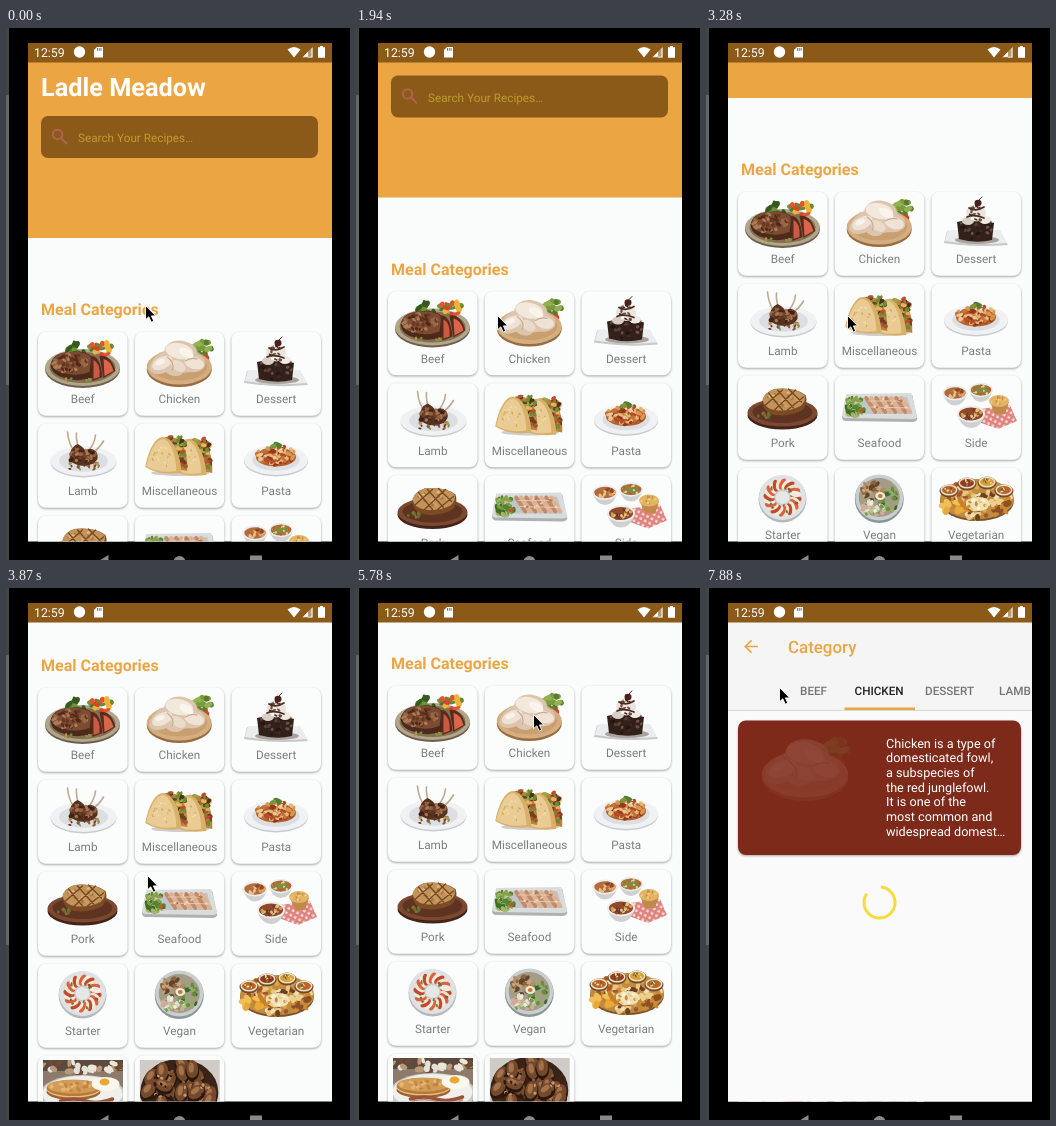
Write an HTML page that moves like this. It is 344 by 532 pixels and loops after 8000 ms.

```html
<!DOCTYPE html>
<html lang="en">
<head>
<meta charset="utf-8">
<title>Recipe app</title>
<style>
  html, body { margin: 0; width: 100%; height: 100%; overflow: hidden; background: #000; }
  svg { display: block; }
  text { font-family: Roboto, sans-serif; text-rendering: geometricPrecision; white-space: pre; }
  .label { font-size: 11.75px; fill: #7c7e7d; text-anchor: middle; }
  .card { fill: #fbfdfc; filter: drop-shadow(0 1px 1.1px rgba(0, 0, 0, .36)); }
  .food { filter: blur(.35px); }
  .tab { font-size: 11.7px; font-weight: 500; fill: #757575; }
  .tab.on { fill: #222; }
  .info { font-size: 12.65px; fill: #fff; }
</style>
</head>
<body>
<svg id="stage" width="344" height="532" viewBox="0 0 344 532">
  <defs>
    <clipPath id="view"><rect x="22" y="34" width="304" height="479.5"/></clipPath>
    <clipPath id="cardClip"><rect width="89.5" height="84" rx="8"/></clipPath>
    <pattern id="check" width="5" height="5" patternUnits="userSpaceOnUse" patternTransform="rotate(28)">
      <rect width="5" height="5" fill="#f3dfda"/><path d="M0 0H2.5V5H0ZM0 0H5V2.5H0Z" fill="#d2443f" fill-opacity=".6"/>
    </pattern>
  </defs>
  <rect width="344" height="532"/>
  <rect width="3" height="532" fill="#444"/>
  <rect y="67" width="3" height="290" fill="#666"/>

  <g clip-path="url(#view)">
    <rect x="22" y="34" width="304" height="480" fill="#f9fcfb"/>
    <g id="home">
      <rect x="22" y="0" width="304" height="210" fill="#eba643"/>
      <text x="35" y="68" font-size="25.3" font-weight="700" fill="#fff">Ladle Meadow</text>
      <rect x="35" y="88" width="277" height="42" rx="7" fill="#8b5a19"/>
      <g fill="none" stroke="#b0624e" stroke-width="2">
        <circle cx="51.5" cy="106.5" r="4.7"/><path d="M55 110L61 116"/>
      </g>
      <text x="72" y="114" font-size="11.75" fill="#bd9d2b">Search Your Recipes…</text>
      <text x="35" y="287" font-size="16" font-weight="700" fill="#eba643">Meal Categories</text>
      <g id="grid"></g>
    </g>

    <g id="page">
      <rect x="22" y="34" width="304" height="480" fill="#fafafa"/>
      <rect x="22" y="34" width="304" height="88.5" fill="#f5f5f5"/>
      <path d="M22 122.5H326" stroke="#d8d8d8"/>
      <path d="M52 58.5H39.5M45.5 52.3L39.3 58.5L45.5 64.7" fill="none" stroke="#eba643" stroke-width="1.7"/>
      <text x="82" y="65" font-size="16.9" font-weight="500" fill="#eba643">Category</text>
      <text class="tab" x="94" y="106.5">BEEF</text>
      <text class="tab on" x="148.5" y="106.5">CHICKEN</text>
      <text class="tab" x="219" y="106.5">DESSERT</text>
      <text class="tab" x="293" y="106.5">LAMB</text>
      <rect x="138.5" y="119.5" width="70.5" height="2.5" fill="#eba643"/>
      <rect x="32" y="132.5" width="283" height="134.5" rx="8" fill="#7d2a1b" style="filter:drop-shadow(0 1px 1px #0005)"/>
      <g id="photo" transform="translate(99 181) scale(1.33)"></g>
      <g id="info"></g>
      <circle id="spinner" cx="173.5" cy="314.5" r="15.5" fill="none" stroke="#f6dc40" stroke-width="3"/>
    </g>
  </g>

  <rect x="22" y="15" width="304" height="19.5" fill="#8b5a19"/>
  <text x="28" y="29" font-size="12.3" fill="#fff">12:59</text>
  <g fill="#fff">
    <circle cx="73.5" cy="24" r="5.7"/>
    <path d="M91 19H97V29.5H88V22Z"/>
    <path d="M281.5 21.5Q288 16.5 294.5 21.5L288 29.5Z"/>
    <path d="M306.5 19V29.5H296.5Z" fill-opacity=".4"/>
    <path d="M302 23.8V29.5H296.5ZM305.5 21V28.8H298.5L296.5 29.5H306.5V19Z"/>
    <path d="M314 18H317V19.2H319V29.8H312V19.2H314Z"/>
  </g>
  <path d="M91.5 20V22.8M93.3 20V22.8M95.1 20V22.8" stroke="#8b5a19" stroke-width=".9"/>
  <g fill="#8a8a8a">
    <path d="M102.5 527V541L91 534Z"/><circle cx="173.5" cy="534" r="6"/><rect x="244" y="527.5" width="12" height="12"/>
  </g>
  <path id="cursor" d="M.5 .5V14.8L3.8 11.8L6.3 17.2L8.8 16.1L6.4 10.9H10.7Z" stroke="#fff" stroke-width=".9"/>
</svg>

<script>
const $ = id => document.getElementById(id);
let seed = 7;
const rnd = () => (seed = seed * 16807 % 2147483647) / 2147483647;

const oval = (x, y, rx, ry, fill, turn = 0) =>
  `<ellipse cx="${x}" cy="${y}" rx="${rx}" ry="${ry}" fill="${fill}" transform="rotate(${turn} ${x} ${y})"/>`;
const shape = (d, fill) => `<path d="${d}" fill="${fill}"/>`;
const line = (d, color, width) =>
  `<path d="${d}" fill="none" stroke="${color}" stroke-width="${width}" stroke-linecap="round"/>`;

// Scatters small crumbs over an elliptical area.
function bits(n, x, y, rx, ry, size, colors) {
  let out = '';
  for (let i = 0; i < n; i++) {
    const a = rnd() * 6.283, r = Math.sqrt(rnd());
    out += oval((x + rx * r * Math.cos(a)).toFixed(1), (y + ry * r * Math.sin(a)).toFixed(1),
      (size * (.6 + rnd() * .6)).toFixed(1), (size * (.4 + rnd() * .4)).toFixed(1),
      colors[i % colors.length], Math.round(rnd() * 180));
  }
  return out;
}

const plate = (x, y, rx, ry) =>
  oval(x, y + 1.5, rx, ry, '#c9cbcd') + oval(x, y, rx, ry, '#f0f1f3') + oval(x, y, rx * .74, ry * .72, '#dcdee1');
const bowl = (x, y, r, colors) =>
  shape(`M${x - r} ${y}Q${x - r * .7} ${y + r} ${x} ${y + r}Q${x + r * .7} ${y + r} ${x + r} ${y}Z`, '#cfd0d2') +
  oval(x, y, r, r * .6, '#eeedeb') + oval(x, y, r * .86, r * .46, colors[0]) +
  bits(24, x, y, r * .75, r * .38, 2, colors);
const photo = body => `<svg x="-39.5" y="-27" width="80" height="54" viewBox="-39.5 -27 80 54">${body}</svg>`;

function starter() {
  let out = oval(0, 0, 24, 23.5, '#b5b8ba') + oval(0, -1.5, 23.5, 22.5, '#dfe1e2') + oval(0, -1.5, 19, 18, '#c9cbc9');
  for (let i = 0; i < 24; i++) {
    const a = i * Math.PI / 12;
    out += oval(13.5 * Math.cos(a), 13.5 * Math.sin(a) - 1.5, 6, 3,
      ['#c14a2b', '#efe3d2', '#d9623f', '#f3ebdf'][i % 4], i * 15 + 25);
  }
  return out + bits(14, 0, -1.5, 16, 15, 1.8, ['#66803c', '#8a5a38']) + oval(0, -1.5, 7, 6.5, '#e6e8e8');
}

// A folded shell with its filling along the open top edge.
const taco = (x, y) => `<g transform="translate(${x} ${y})">` +
  shape('M-19 10C-13-10-5-20 5-17C17-14 21 2 20 17Z', '#b78442') +
  bits(44, 7, -8, 12, 10, 2.8, ['#6a8d34', '#c4482c', '#6e4024', '#e3b458', '#96ab48', '#4e3220']) +
  bits(12, 16, 6, 4, 9, 2.6, ['#6a8d34', '#c4482c', '#6e4024']) +
  shape('M-22 13C-19-4-12-17-4-17C7-16 14 4 14 19Q-8 22-22 13Z', '#d9b06a') +
  shape('M-21 12C-17-4-11-15-4-15C4-13 9 4 9 17Q-8 20-21 12Z', '#e9cc93') +
  bits(18, -6, 3, 9, 11, 1.3, ['#d3a760', '#f1dcae']) + '</g>';

const foods = {
  Beef: oval(0, 6.5, 37.5, 18.5, '#6d5f4c') + oval(0, 4.5, 37.5, 18.5, '#b1a58c') + oval(0, 4.5, 33, 15.5, '#84704f') +
    bits(16, -3, -14, 13, 6, 4, ['#4f752c', '#6e9638', '#35591f']) +
    bits(14, 17, -13, 12, 7, 4, ['#e0552b', '#efb338', '#d8432c', '#648a35']) +
    shape('M-32 2Q-30-10-14-11Q2-13 10-6L12 14Q-4 20-18 15Q-31 12-32 2Z', '#4b2a1b') +
    shape('M-31 0Q-28-10-14-11Q2-12 9-6L7 9Q-6 14-18 10Q-30 8-31 0Z', '#7d4b31') +
    bits(46, -12, 0, 18, 9, 2.4, ['#50291a', '#99684a', '#693720', '#ad7d58']) +
    shape('M8-7Q18-8 20 14L10 18Z', '#5a2b1c') + shape('M11-3Q18 0 17 14L11 16Z', '#cb5a44') +
    shape('M17-7Q28-9 33 8L21 15Z', '#5a2b1c') + shape('M21-4Q28-3 31 8L22 13Z', '#d9654c') +
    bits(9, -8, 17, 18, 2, 1.8, ['#6d8e3a', '#b98b4d']),
  Chicken: bits(16, 20, -15, 12, 8, 4, ['#7a9b3d', '#92b152', '#587c2c']) + oval(26, -5, 4, 3.5, '#cf442c') +
    oval(0, 6.5, 32.5, 17.5, '#9a6c42') + oval(0, 4, 32.5, 17.5, '#d4ae80') + oval(0, 3.5, 28, 14, '#c99f70') +
    shape('M-30 6C-29-3-22-8-15-12C-14-19-6-24 4-22C15-20 18-14 18-9C27-6 29 4 22 7C15 11 9 8 4 10C-3 16-10 12-13 9C-21 13-28 11-30 6Z', '#dcc5ae') +
    oval(0, -12, 14, 8, '#f3e8dc', 12) + oval(-17, 0, 11, 6, '#efe2d5', -25) + oval(15, 0, 10, 6, '#f0e2d4', 15) +
    oval(-1, 3, 8, 5, '#eadaca', 30) + oval(7, -10, 8, 4, '#faf4ec', 30) +
    line('M-12-6Q-4 0-7 7M6-2Q12-6 18-4', '#c9ab90', 1.1) + oval(-19, -1, 5, 2.5, '#faf3eb', -25),
  Dessert: shape('M-29 8L24 8L32 22Q0 25-32 20Z', '#c6c8ca') + shape('M-28 7L24 7L31 20Q0 23-31 18Z', '#ebecee') +
    oval(1, 17, 22, 4, '#aaa29c') + shape('M-19-1Q0-6 18 0L16 17Q0 21-17 16Z', '#32201b') +
    bits(30, 0, 5, 17, 11, 2.6, ['#251510', '#5d4034', '#422820', '#6d5042']) +
    oval(0, -10, 10, 8.5, '#e9e4de') + oval(-8, -2, 6, 4, '#d8cfc7') + oval(9, -3, 6, 4, '#efeae4') +
    bits(16, 1, -10, 9, 8, 2.2, ['#4a2a20', '#6d4c3f', '#f7f4ef']) +
    line('M-7-15Q0-11 8-16M-9-6Q-2-9 8-5', '#4a2a20', 1.7) +
    oval(2, -20, 3.5, 3.3, '#4a211c') + line('M3-23L6-26', '#4b2b22', 1),
  Lamb: plate(1, 6, 33, 15) + line('M-6 0Q-14-10-15-23M-2-2Q-7-14-6-22M4-2Q12-10 13-20M8 0Q17-7 21-14', '#bfa791', 1.6) +
    bits(16, 0, 7, 18, 7, 2.6, ['#6c8240', '#b9935b', '#c8a878', '#8b5c3b']) +
    shape('M-13 5Q-13-8-5-11Q1-8 3-4Q8-9 14-3Q18 4 10 9Q-4 14-13 5Z', '#55321f') +
    bits(30, 0, 1, 13, 8, 2.7, ['#6f4029', '#3d2218', '#94603f', '#a97754']) +
    bits(10, 2, 13, 18, 3, 1.7, ['#6b3524', '#8f5638', '#7a8b47']),
  Miscellaneous: oval(1, 18, 29, 3, '#d0cdca') + taco(13, 1) + taco(-12, -1),
  Pasta: plate(0, 5, 32, 15) + oval(0, 2, 20, 9.5, '#b3602f') +
    bits(75, 0, 0, 19, 9.5, 2.9, ['#d9964f', '#b44a28', '#e5b873', '#c8703c', '#94391f', '#e9c894']) +
    oval(2, -10, 5, 2.5, '#527d32', 25) + oval(-3, -9, 3.5, 2, '#759a42', -30) + bits(10, 2, -4, 13, 5, 1.2, ['#f6e7c4', '#6a8f3a']),
  Pork: oval(0, 8, 35, 14.5, '#43231a') + oval(0, 5.5, 35, 14, '#7c4930') + oval(0, 5, 30, 11, '#5e3322') +
    shape('M-20-6Q-18-15-8-18Q12-20 23-12Q26-4 20 3Q8 10-8 8Q-20 5-20-6Z', '#7b4b25') +
    shape('M-20-8Q-17-15-8-18Q12-20 22-12Q24-6 18-1Q6 5-8 3Q-19 1-20-8Z', '#c2935a') +
    bits(24, 1, -8, 18, 8, 2, ['#dfb980', '#a97540', '#cda066']) +
    line('M-14-14L0 3M-5-17L11 1M6-18L19-5M-17-2L0-17M-8 3L13-17M5 3L21-10', '#75481f', 1.3) +
    bits(10, -19, 9, 7, 3, 2, ['#56742b', '#8b6b36']),
  Seafood: shape('M-33-11L33-12L38 12Q37 15 33 15L-34 14Q-38 13-37 9Z', '#aeb1b3') +
    shape('M-33-13L32-14L38 9Q38 12 33 12L-34 11Q-38 10-37 7Z', '#d9dcdd') + shape('M-28-9L28-10L33 7L-31 7Z', '#c1c5c5') +
    [...Array(8)].map((_, i) => line(`M${-13 + i * 5}-9L${-4 + i * 5} 5`, i % 2 ? '#dfb191' : '#c28a68', 4)).join('') +
    line('M-9 0L31 1M-11-6L25-6', '#ecd0b8', .8) + bits(14, 11, -3, 19, 6, 1.4, ['#b5764f', '#f0d9c4']) +
    bits(44, -24, 0, 10, 11, 3, ['#57842c', '#79a23e', '#a3b568', '#436c25', '#8aa04c']) + oval(-18, 4, 2.5, 2, '#b8593a'),
  Side: shape('M4 2L34-2L41 14L22 22L0 14Z', 'url(#check)') +
    bowl(-21, -14, 12.5, ['#b36a3c', '#dfab66', '#8c4529', '#e7c690']) + bowl(5, -17, 12, ['#9a7a3d', '#cf5430', '#6f9440', '#e5d4a0']) +
    bowl(-5, 7, 14, ['#8f4a2b', '#dc9d5a', '#6f3825', '#d9c38c']) +
    shape('M14-5L33-5L29 7L19 7Z', '#bf8a4b') + oval(23, -6, 10, 6, '#e2b565') + bits(12, 23, -6, 8, 4, 1.7, ['#f1cd83', '#c98e42']),
  Starter: starter(),
  Vegan: oval(0, 0, 24.5, 24, '#8b9497') + oval(0, -1.5, 24, 23, '#c9cfcf') + oval(0, -1.5, 20.5, 19.5, '#a39c86') +
    bits(40, -6, -8, 13, 10, 2.9, ['#8c633f', '#b98a56', '#64442d', '#c9a679']) + bits(30, 10, 2, 9, 13, 2.8, ['#688d42', '#94ac68', '#3e6533']) +
    bits(30, -5, 9, 12, 7, 3, ['#e5ddd2', '#d3a99b', '#b6c88a', '#efece2', '#79954f']) +
    oval(1, -3, 5, 4, '#eee9d6') + oval(1, -3, 2.4, 2, '#c5733f'),
  Vegetarian: oval(1, 2, 37, 20, '#7c5229') + oval(1, 0, 37, 20, '#c08c42') +
    bits(90, 1, 0, 35, 19, 3.6, ['#dda944', '#a5562a', '#e8c680', '#6c4121', '#f0dfb5', '#cf8a33']) +
    [[-27, -9], [-9, -16], [11, -17], [28, -9]].map(([x, y], i) =>
      oval(x, y + 1, 9.5, 6.5, '#74492a') + oval(x, y, 8.5, 5.5, '#eee0c4') +
      oval(x, y, 7, 4, ['#b8652a', '#8f3c20', '#d8a03a'][i % 3]) + bits(8, x, y, 5, 3, 1.4, ['#7c8b40', '#f1dc9d', '#873b1c'])).join('') +
    bits(14, -22, 7, 11, 7, 5, ['#e8a83a', '#f0bf58', '#c97f27']) + oval(2, 5, 12, 7, '#efe2ba') +
    bits(16, 2, 5, 11, 6, 2, ['#e9cf7f', '#fbf3d9', '#c78d3d']) + bits(14, 24, 7, 10, 7, 4, ['#d08a34', '#8a5128', '#edcf8d']),
  Breakfast: photo(shape('M-40-27H41V27H-40Z', '#8d7a6b') + shape('M-40-27H41V-16H-40Z', '#5d4a3f') +
    bits(26, 0, -21, 40, 6, 4, ['#b99a78', '#efe6da', '#6f4a33', '#e4e0da']) +
    oval(0, 8, 43, 20, '#c9c9c7') + oval(0, 7, 40, 18, '#f0efeb') +
    oval(-9, 5, 27, 8, '#9d632f') + oval(-9, 2.5, 27, 8, '#e3be83') + oval(-9, 1, 27, 8, '#b8793a') + oval(-9, -.5, 26, 7, '#d39c56') +
    bits(18, -9, -1, 22, 5, 2.6, ['#e3b671', '#c2853f']) + oval(23, -3, 14, 7, '#faf7ec') + oval(22, -5, 5, 3.5, '#e9a834') +
    line('M-22 14Q-8 10 3 14T30 12', '#98533a', 3.5) + line('M-20 16Q-6 13 6 17T30 15', '#c58a66', 1.5)),
  Goat: photo(shape('M-40-27H41V27H-40Z', '#cfccc7') + oval(0, 5, 39, 33, '#3a2418') +
    [...Array(26)].map(() => {
      const x = Math.round(rnd() * 68 - 34), y = Math.round(rnd() * 46 - 23), turn = Math.round(rnd() * 180);
      return oval(x, y + 2, 10, 7, '#2a1810', turn) + oval(x, y, 9, 6, '#75492c', turn) + oval(x - 1, y - 1.5, 5, 2.6, '#a3744c', turn);
    }).join('') + bits(30, 0, 0, 34, 24, 2, ['#c39a6d', '#2d1911', '#8b5d3a']))
};

$('grid').innerHTML = Object.entries(foods).map(([name, art], i) => {
  const x = 32 + i % 3 * 96.75, y = 303.8 + Math.floor(i / 3) * 92;
  const ripple = name === 'Chicken' ? '<g clip-path="url(#cardClip)"><circle id="ripple" cx="48" cy="28" fill="#000"/></g>' : '';
  return `<g transform="translate(${x} ${y})"><rect class="card" width="89.5" height="84" rx="8"/>
    <g class="food" transform="translate(44.5 31.2)">${art}</g><text class="label" x="44.7" y="71.7">${name}</text>${ripple}</g>`;
}).join('');
$('photo').innerHTML = foods.Chicken;
$('info').innerHTML = ['Chicken is a type of', 'domesticated fowl,', 'a subspecies of', 'the red junglefowl.',
  'It is one of the', 'most common and', 'widespread domest…']
  .map((s, i) => `<text class="info" x="180" y="${159.5 + i * 14.7}">${s}</text>`).join('');

// Keys are [tick, value, ...]; values between keys are linear.
const tracks = {
  scroll: [[8, 0], [11, 30], [12, 30], [13, 40.5], [18, 106], [20, 118], [22, 140], [26, 204], [28, 204], [31, 206]],
  cursor: [[2, 139, 277], [3, 140, 228], [4, 140, 258], [5, 141, 287], [28, 141, 287], [31, 177, 126], [48, 177, 126], [53, 73, 99]],
  ripple: [[35, 0, 0], [36, 22, .1], [37, 45, .1], [38, 70, .05], [39, 80, 0]],
  page: [[41, 0, .9], [42, .3, .94], [43, .75, .98], [44, 1, 1]],
  photo: [[44, 0], [53, .14]]
};
function at(keys, k) {
  const i = keys.findIndex(key => key[0] > k);
  if (i < 1) return keys[i ? keys.length - 1 : 0].slice(1);
  const a = keys[i - 1], b = keys[i], p = (k - a[0]) / (b[0] - a[0]);
  return a.slice(1).map((v, j) => v + (b[j + 1] - v) * p);
}
const set = (id, attrs) => { for (const n in attrs) $(id).setAttribute(n, attrs[n]); };

const LOOP = 8000, TICK = 148.7;
function draw() {
  const k = Math.floor((performance.now() % LOOP + 25) / TICK);
  const [r, shade] = at(tracks.ripple, k), [alpha, zoom] = at(tracks.page, k);
  set('home', { transform: `translate(0 ${-at(tracks.scroll, k)[0]})` });
  set('cursor', { transform: `translate(${at(tracks.cursor, k)})` });
  set('ripple', { r, opacity: shade });
  set('page', { opacity: alpha, transform: `translate(174 274) scale(${zoom}) translate(-174 -274)` });
  set('photo', { opacity: at(tracks.photo, k)[0] });
  const sweep = 160 + 140 * Math.cos((k - 53) * 2 * Math.PI / 9);
  set('spinner', {
    pathLength: 360, 'stroke-dasharray': `${sweep} ${360 - sweep}`,
    transform: `rotate(${-85 + (k - 53) * 60} 173.5 314.5)`
  });
  requestAnimationFrame(draw);
}
draw();
</script>
</body>
</html>
```
